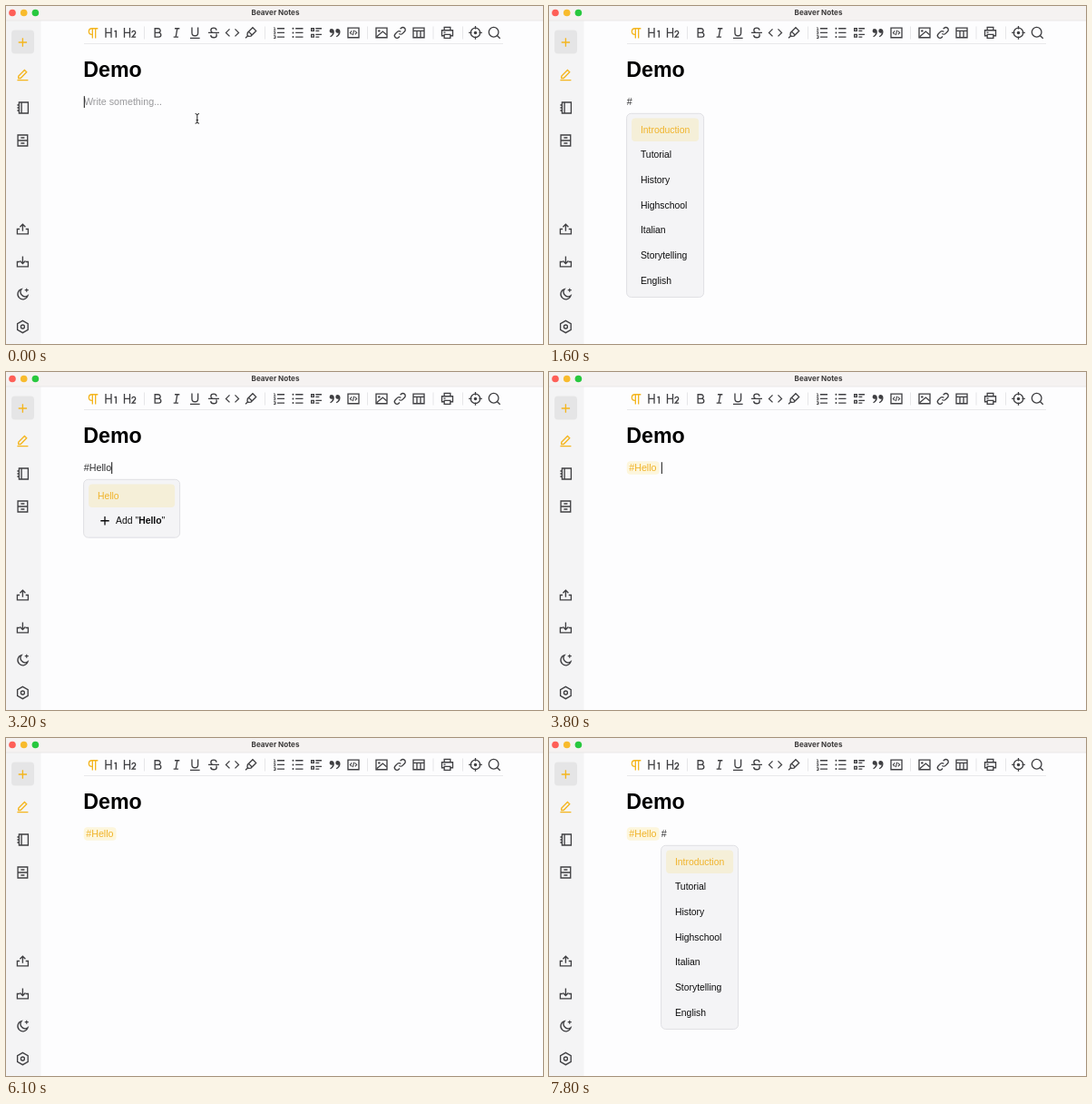
These frames come from a looping animation (592 by 372 pixels, 8000 ms). An HTML page:

```html
<!DOCTYPE html>
<html lang="en">
<head>
<meta charset="utf-8">
<title>Beaver Notes</title>
<style>
html, body { margin: 0; width: 100%; height: 100%; overflow: hidden; background: #fdfdfe; }
svg { display: block; width: 592px; height: 372px; }
text { font-family: "Liberation Sans", Arial, sans-serif; white-space: pre; }
.body { font-size: 10.72px; }
.item { font-size: 10.4px; }
.icon { fill: none; stroke: #3f3f42; stroke-width: 2; }
.icon .solid { fill: #3f3f42; stroke: none; }
.icon.on { stroke: #f4b51e; }
.icon.on .solid { fill: #f4b51e; }
</style>
</head>
<body>
<svg id="stage" viewBox="0 0 592 372" xmlns="http://www.w3.org/2000/svg">
  <rect width="592" height="372" fill="#fdfdfe"/>
  <rect y="16" width="38.5" height="356" fill="#f4f4f5"/>
  <rect width="592" height="16" fill="#f5f2f1"/>
  <rect y="15.6" width="592" height=".8" fill="#e6e3e3"/>
  <circle cx="7" cy="7.5" r="3.8" fill="#fe5f57"/>
  <circle cx="19.7" cy="7.5" r="3.8" fill="#f8bb2d"/>
  <circle cx="32.4" cy="7.5" r="3.8" fill="#28c83f"/>
  <text x="297" y="10.2" text-anchor="middle" fill="#3a3838" style="font:700 8.1px Inter,sans-serif">Beaver Notes</text>
  <rect x="6" y="26.5" width="25" height="26" rx="4" fill="#e5e5e6"/>
  <rect x="86" y="41" width="462" height="1" fill="#e9e9eb"/>
  <g id="icons"></g>
  <text x="85.3" y="78.4" font-size="23.2" font-weight="700">Demo</text>
  <text id="hint" class="body" x="85.9" y="109.3" fill="#98989b">Write something...</text>
  <g id="tag">
    <rect x="85.8" y="98.3" width="35.8" height="14.4" rx="4" fill="#fdf6dc"/>
    <text class="body" x="88.2" y="109.3" fill="#f0b32a">#Hello</text>
  </g>
  <text id="typed" class="body" y="109.3" fill="#2c2c2e"></text>
  <rect id="caret" y="99.2" width="1" height="12.8" fill="#111"/>
  <g id="popup"></g>
  <path id="mouse" d="M208.6 118.6q2.2 0 2.2 1.4q0-1.4 2.2-1.4M210.8 120v8M208.6 129.2q2.2 0 2.2-1.4q0 1.4 2.2 1.4M209.6 125.6h2.4" fill="none" stroke="#222" stroke-width="1"/>
</svg>
<script>
const $ = id => document.getElementById(id);
const solid = d => `<path class="solid" d="${d}"/>`;
const line = (d, w = 2) => `<path d="${d}" stroke-width="${w}"/>`;
const ring = (x, y, r) => `<circle cx="${x}" cy="${y}" r="${r}"/>`;
const dot = (x, y, r) => `<circle class="solid" cx="${x}" cy="${y}" r="${r}"/>`;

const bigH = "M13 20h-2v-7H4v7H2V4h2v7h7V4h2z";
const frame = "M3 4h18v16H3z";
const tray = "M7 12H3v8h18v-8h-4";
const quote = "c1.03 1.094 1.583 2.321 1.583 4.31 0 3.5-2.457 6.637-6.03 8.188l-.893-1.378c3.335-1.804 3.987-4.145 4.247-5.621-.537.278-1.24.375-1.929.311-1.804-.167-3.226-1.648-3.226-3.489a3.5 3.5 0 0 1 3.5-3.5c1.073 0 2.099.49 2.748 1.179z";

const bar = [
  [96, solid("M12 6v15h-2v-5a6 6 0 1 1 0-12h10v2h-3v15h-2V6zm-2 0a4 4 0 1 0 0 8z")],
  [116, solid(bigH + "M21 8v12h-2v-9.8l-2 .54V8.67L19.5 8z")],
  [136.5, solid(bigH) + line("M15.7 12a2.8 2.8 0 1 1 4.9 1.6L16 19h6")],
  [167.5, solid("M8 11h4.5a2.5 2.5 0 1 0 0-5H8zm10 4.5a4.5 4.5 0 0 1-4.5 4.5H6V4h6.5a4.5 4.5 0 0 1 3.256 7.606A4.5 4.5 0 0 1 18 15.5zM8 13v5h5.5a2.5 2.5 0 1 0 0-5z")],
  [188, solid("M15 20H7v-2h2.927l2.116-12H9V4h8v2h-2.927l-2.116 12H15z")],
  [208.3, line("M7 3v9a5 5 0 1 0 10 0V3M4 21h16")],
  [229, line("M3 12h18M16.5 8C16.3 5.5 14 4 12 4C9 4 7.3 5.7 7.3 8C7.3 9.5 8 10.6 9.5 11.5M7 16c.3 2.5 2.5 4 5 4c3 0 4.8-1.6 4.8-3.9c0-1-.3-1.9-.8-2.6")],
  [249.5, line("M7.5 6L1.5 12l6 6M16.5 6l6 6l-6 6")],
  [270, line("M15 3.5L20.5 9L12 17.5l-4 .5l-2-2l.5-4zM8.5 10.5l5 5M3 20.8l4.2-3.8")],
  [301, line("M9 5h12M9 12h12M9 19h12") + line("M3.3 3.6h1.5V8M3 8h3.6M3 10.6h3v1.5l-2.6 2H6.6M3 17h3.2v4.2H3M4 19h2", 1.3)],
  [321.5, line("M8.5 5H21M8.5 12H21M8.5 19H21") + dot(4.4, 5, 1.5) + dot(4.4, 12, 1.5) + dot(4.4, 19, 1.5)],
  [342, line("M4 5h4v4H4zM4 15h4v4H4zM11 5h10M11 9h6M11 15h10M11 19h6")],
  [362.5, solid("M19.417 6.679" + quote + "M9.417 6.679" + quote)],
  [383, line(frame) + line("M9.5 9l-3 3l3 3M14.5 9l3 3l-3 3M13 8l-2 8", 1.6)],
  [414, line(frame) + line("M4 18.5L14 10l6.5 5.5") + dot(8, 9, 1.8)],
  [434.3, line("M10.5 13.5a4 4 0 0 0 5.7 0l3.5-3.5a4 4 0 0 0-5.7-5.7l-1.5 1.5M13.5 10.5a4 4 0 0 0-5.7 0L4.3 14a4 4 0 0 0 5.7 5.7l1.5-1.5")],
  [455, line(frame + "M3 9h18M9 9v11M15 9v11")],
  [486.5, line("M7 8V3h10v5M6 17H3V8h18v9h-3M7 15h10v6H7zM6 11.5h3")],
  [517.5, ring(12, 12, 7.8) + dot(12, 12, 2.6) + line("M12 1v5M12 18v5M1 12h5M18 12h5")],
  [538.3, ring(11, 11, 8) + line("M16.6 16.6l5 5")]
];
const side = [
  [40, line("M12 5v14M5 12h14")],
  [75.5, line("M5 14.5L15 4.5L18.5 8l-10 10H5zM3 21.3h18")],
  [112, line("M6 3h15v18H6zM10 3v18M3 7.5h3M3 12h3M3 16.5h3")],
  [148, line("M4 3h16v18H4zM4 12h16M9 7.5h6M9 16.5h6")],
  [245.5, line(tray + "M12 15.5V4M7.5 8.5L12 4l4.5 4.5")],
  [281.5, line(tray + "M12 3v12M7.5 10.5L12 15l4.5-4.5")],
  [317, line("M10 4a8.5 8.5 0 1 0 10.5 10.5A7.5 7.5 0 0 1 10 4z") + line("M18.5 2.5v6M15.5 5.5h6", 1.7)],
  [353, line("M12 2l8.7 5v10L12 22l-8.7-5V7z") + ring(12, 12, 3)]
];
const icon = (x, y, art, on) =>
  `<g class="icon${on ? " on" : ""}" transform="translate(${x - 8} ${y - 8}) scale(.6667)">${art}</g>`;

$("icons").innerHTML =
  bar.map(([x, art], i) => icon(x, 29.4, art, i === 0)).join("") +
  side.map(([y, art], i) => icon(18.4, y, art, i < 2)).join("") +
  [152.5, 285.5, 398.5, 471, 503.5].map(x => `<rect x="${x - .5}" y="22.5" width="1" height="14" fill="#e6e6e8"/>`).join("");

const all = ["Introduction", "Tutorial", "History", "Highschool", "Italian", "Storytelling", "English"];
const matches = { "": all, H: ["History", "Highschool", "Hi", "Hello"] };
const widths = [85, 89, 94.5, 97.3, 100.2, 106];
const step = 27.65;

function popupArt(query) {
  const rows = matches[query] || ["Hello"];
  const n = rows.length + (query ? 1 : 0);
  const w = widths[query.length];
  const base = i => 139.7 + i * step;
  let art = `<rect x=".5" y="118.3" width="${w}" height="${n * step + 8.6}" rx="5" fill="#f4f4f6" stroke="#dddde1" stroke-width=".9"/>
    <rect x="6" y="123.6" width="${w - 11}" height="25.4" rx="4" fill="#f5efd8"/>`;
  rows.forEach((s, i) => {
    art += `<text class="item" x="15.8" y="${base(i)}" fill="${i ? "#0c0c0d" : "#f0b32a"}">${s}</text>`;
  });
  if (query) {
    const y = base(n - 1);
    art += `<path d="M19.2 ${y - 3.6}h9.4M23.9 ${y - 8.3}v9.4" stroke="#0c0c0d" stroke-width="1.3"/>
      <text class="item" x="36" y="${y}" fill="#0c0c0d">Add "<tspan font-weight="700">${query}</tspan>"</text>`;
  }
  return art;
}

// [time, typed text]
const keys = [[0, ""], [1000, "#"], [1900, "#H"], [2300, "#He"], [2500, "#Hel"], [2700, "#Hell"], [3000, "#Hello"], [3500, ""], [7300, "#"]];
const loop = 8000, half = 500, blinkLead = 300;
let shown = null;

const show = (id, on) => $(id).setAttribute("visibility", on ? "visible" : "hidden");

function draw(t) {
  const [since, text] = keys.filter(k => k[0] <= t).pop();
  const tagged = t >= 3500;
  const x = tagged ? 123.8 : 85.8;
  show("mouse", t < 100);
  show("hint", t < 1000);
  show("tag", tagged);

  const typed = $("typed");
  typed.setAttribute("x", x);
  typed.textContent = text;
  $("caret").setAttribute("x", x + (text ? typed.getComputedTextLength() : 0));
  const age = t - since + (since ? 0 : blinkLead);
  show("caret", age % (2 * half) < half);

  const start = tagged ? 7400 : 1100;
  const p = Math.min(1, Math.max(0, (t - start) / 300));
  const ease = 1 - (1 - p) ** 3;
  const query = text.slice(1);
  if (query !== shown) $("popup").innerHTML = popupArt(shown = query);
  show("popup", text && p > 0);
  $("popup").setAttribute("opacity", ease);
  $("popup").setAttribute("transform", `translate(${x - .7} ${4 * (1 - ease)})`);
}

const begin = performance.now();
function tick() {
  draw((performance.now() - begin) % loop);
  requestAnimationFrame(tick);
}
tick();
</script>
</body>
</html>
```
